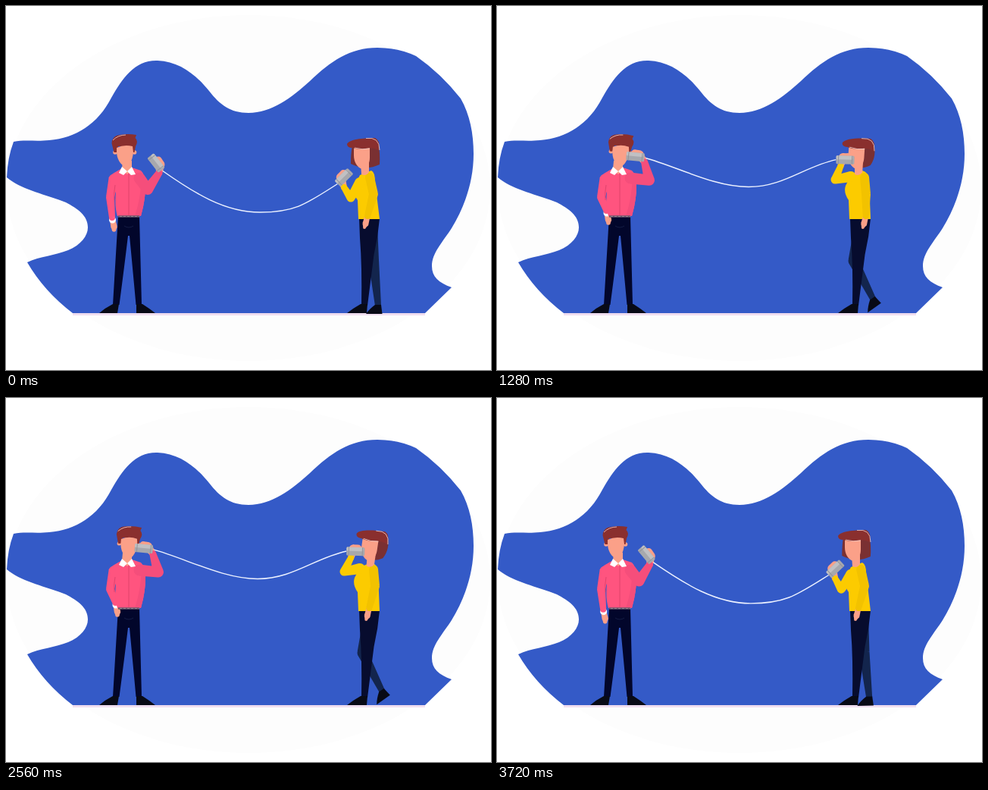
Write an HTML page that moves like this. It is 640x480 px and loops after 3.76 s.

```html
<!DOCTYPE html>
<html lang="en">
<head>
<meta charset="utf-8">
<title>Tin can telephone</title>
<style>
  html, body { margin: 0; width: 100%; height: 100%; overflow: hidden; background: #fff; }
  svg { display: block; width: 100vw; height: 100vh; }
  .skin { fill: #fba088; }
  .navy { fill: #02062b; }
  .shoe { fill: #080a16; }
  .pink { fill: #ff547f; }
  .rose { fill: #f54e7b; }
  .yellow { fill: #fccb00; }
  .amber { fill: #f2c200; }
  .hair { fill: #8a2f2e; }
  .bob { fill: #7a3032; }
  .shine { fill: none; stroke: #f0cfcb; stroke-width: .8; }
  .white { fill: #fff; }
</style>
</head>
<body>
<svg viewBox="0 0 640 480">
  <defs>
    <g id="tin">
      <rect x="-12" y="-5.5" width="24" height="11" rx="1.5" fill="#a7a8ad"/>
      <rect x="-12" y="-5.5" width="22" height="5" rx="1.5" fill="#c0c0c3"/>
      <path d="M-9-5.5V5.5M9-5.5V5.5" stroke="#929399"/>
    </g>
  </defs>

  <ellipse cx="320" cy="240" rx="319" ry="228" fill="#fdfdfd"/>
  <path fill="#345ac7" d="M10 179C25 176 39 179 57 177C92 174 121 156 139 121C154 95 170 71 200 72
    C229 73 251 91 268 112C282 130 296 141 320 141C350 141 377 121 401 99C428 73 454 55 490 55
    Q518 55 541 66Q574 89 600 122C612 143 617 168 617 195C617 232 605 265 588 293
    C575 313 562 326 562 343C562 357 571 365 588 371L553 405H88Q50 376 28 338
    C45 330 65 329 82 322C99 315 108 303 108 292C108 276 94 267 79 259C55 249 21 243 1 226Q2 200 10 179Z"/>
  <path d="M88 406.5H553" stroke="#f0def0" stroke-width="3"/>
  <path id="string" fill="none" stroke="#edf2ff" stroke-width="1.4"/>

  <g id="man">
    <path class="navy" d="M148 277H176L179 394H171.5Q167 345 163 303H161Q156 345 149.500 394H141Z"/>
    <path d="M156 290Q162 294 168 290" fill="none" stroke="#18214a" stroke-width=".8"/>
    <path class="shoe" d="M141 393H149L147 405H123Q131 398 141 393ZM172 393H180Q188 398 197 405H172Z"/>
    <path id="manRestHand" class="skin"/>
    <path id="manCuff" class="white"/>
    <path id="manRestArm" class="pink"/>
    <path id="manHand" class="skin"/>
    <path class="pink" d="M153 214L141 221Q136 226 138 236L145 246Q143 264 147 277H178Q184 256 184 238Q184 222 178 217L166 213Z"/>
    <path class="rose" d="M179 222Q178 254 170 277H178Q184 256 184 238Z"/>
    <path d="M162 221V276M144 236Q142 246 143 256" fill="none" stroke="#d83f69" stroke-width=".8"/>
    <path id="manArm" class="rose"/>
    <path class="skin" d="M154 204H166V215L160 222L153 215Z"/>
    <path class="white" d="M153 212L149 220L155 223L160 218ZM166 212L171 222L165 223L160 218Z"/>
    <path d="M148 277.5H176" stroke="#69576d" stroke-width="2.5"/>
    <path d="M150 277.500H176" stroke="#a68c94" stroke-width=".8" stroke-dasharray="3 2"/>
    <g id="manHead">
      <circle class="skin" cx="144" cy="193" r="2.8"/>
      <circle class="skin" cx="169.5" cy="193" r="2.8"/>
      <path class="hair" d="M142.500 193L139.500 181Q140 171 150 170Q161 168 172 170L170.500 174Q175 178 171 185L169.500 193H167L166 185H148L146 193Z"/>
      <path class="skin" d="M146 187Q156 182 167 185L168 193C167 203 163 211 158 212C151 210 146 201 146 192Z"/>
      <path class="shine" d="M141 177Q148 170 158 170"/>
    </g>
    <use id="manCan" href="#tin"/>
  </g>

  <g id="woman">
    <path id="backLeg" fill="#13254d"/>
    <path id="backShoe" class="shoe" d="M-4-1H4L5.500 11H-16Q-12 5-4-1Z"/>
    <path fill="#070c2e" d="M466 280H493Q491 304 485.500 328L477 395H469Q470 344 467 306Z"/>
    <path class="shoe" d="M468 393H477L476 405H450Q459 398 468 393Z"/>
    <path id="womanHand" class="skin"/>
    <path id="womanTop" class="yellow"/>
    <path id="womanArm" class="yellow"/>
    <path id="swingHand" class="skin"/>
    <path id="swingArm" class="amber"/>
    <g id="womanHead">
      <path id="bob" class="bob"/>
      <path class="skin" d="M468 206H479V219Q475 225 469 222Z"/>
      <path class="skin" d="M459 186H480V200C480 208 476 215 470 215C463 213 459 205 459 197Z"/>
      <path class="hair" d="M450 182C453 176 470 174 487 174Q494 177 492 190Q484 186 475 188Q466 190 457 187Q450 187 450 182Z"/>
      <path class="shine" d="M460 187Q470 190 480 188M475 174.500Q493 172 493 190"/>
    </g>
    <use id="womanCan" href="#tin"/>
  </g>
</svg>

<script>
const LOOP = 3760, STEP = 40;

// time, man's nod, woman's nod, swing of her free arm
const poses = [
  [0, 0, 0, 0],
  [440, 0, 0, 0],
  [760, 3, 2, 5],
  [1280, 7, 5, 13],
  [1920, 2.5, 5, 5],
  [2560, 6, 11, 3],
  [3080, 12, 12, 10],
  [3720, 0, 0, 0],
  [LOOP, 0, 0, 0]
];

const $ = id => document.getElementById(id);
const mix = (a, b, k) => a + (b - a) * k;
const mixPoint = (a, b, k) => a.map((v, i) => mix(v, b[i], k));
const add = ([x, y], [dx, dy]) => [x + dx, y + dy];
const ease = (from, to, t) => {
  const k = Math.min(1, Math.max(0, (t - from) / (to - from)));
  return k * k * (3 - 2 * k);
};
const draw = (id, d) => $(id).setAttribute('d', d);
const place = (id, value) => $(id).setAttribute('transform', value);

// Tapered rounded limb through [x, y, radius] joints
function limb(...joints) {
  const disc = ([x, y, r]) => `M${x - r} ${y}a${r} ${r} 0 1 0 ${2 * r} 0a${r} ${r} 0 1 0 ${-2 * r} 0Z`;
  let d = joints.map(disc).join('');
  for (let i = 1; i < joints.length; i++) {
    const [ax, ay, ar] = joints[i - 1], [bx, by, br] = joints[i];
    const length = Math.hypot(bx - ax, by - ay) || 1;
    const nx = (ay - by) / length, ny = (bx - ax) / length;
    d += `M${ax + nx * ar} ${ay + ny * ar}L${bx + nx * br} ${by + ny * br}` +
         `L${bx - nx * br} ${by - ny * br}L${ax - nx * ar} ${ay - ny * ar}Z`;
  }
  return d;
}

function local([x, y, angle], dx, dy) {
  const a = angle * Math.PI / 180, c = Math.cos(a), s = Math.sin(a);
  return [x + dx * c - dy * s, y + dx * s + dy * c];
}

function setCan(id, [x, y, angle]) {
  place(id, `translate(${x} ${y}) rotate(${angle})`);
}

function nod(id, amount, x, y) {
  place(id, `translate(${amount * .62} 0) rotate(${amount * .75} ${x} ${y})`);
}

function poseAt(t) {
  const i = Math.max(1, poses.findIndex(p => p[0] > t));
  const a = poses[i - 1], b = poses[i];
  return mixPoint(a, b, ease(a[0], b[0], t)).slice(1);
}

function drawMan(call, tilt) {
  const can = mixPoint([198, 207, 52], [177.500 + tilt * .72, 197 + tilt * .25, 4 + tilt * .25], call);
  const wrist = add(can, [mix(4, 12, call), mix(13, 7, call)]);
  const elbow = mixPoint([187, 242], [201, 229 + tilt * .1], call);
  const cuff = mixPoint([140.5, 282], [145, 273], call);
  const palm = add(cuff, [2, 9]);

  nod('manHead', tilt, 160, 214);
  setCan('manCan', can);
  draw('manHand', limb([...wrist, 4], [...local(can, 5, -3), 6], [...local(can, -1, -4.5), 5]));
  draw('manArm', limb([176, 227, 7.5], [...elbow, 7], [...wrist, 4.5]));
  draw('manRestArm', limb([142, 228, 6.5], [137.5, 252, 5.5], [...add(cuff, [-.5, -3]), 4]));
  draw('manCuff', limb([...cuff, 4.5]));
  draw('manRestHand', limb([...cuff, 3.5], [...palm, 4.2], [...add(palm, [0, 4]), 2.8]));
  return local(can, 12, 0);
}

function drawWoman(call, tilt, swing) {
  const can = mixPoint([446, 226, -45], [458 + tilt * .3, 203.500 - tilt * .1, 2], call);
  const wrist = add(can, [mix(0, -6, call), mix(13, 8, call)]);
  const elbow = mixPoint([455, 253], [446, 229], call);
  elbow[0] -= 4 * Math.sin(Math.PI * call);
  const free = [477 + swing * .75, 277];
  const knee = mixPoint([485, 335], [470.500, 336], call);
  const ankle = mixPoint([491, 395], [496, 386], call);

  nod('womanHead', tilt, 474, 220);
  const left = mix(455, 463, call), right = mix(493, 489, call), curl = mix(494, 497, call);
  draw('bob', `M457 184Q${left} 194 ${left} 208Q474 218 ${right} 209Q${curl} 196 491 178Z`);
  const shoulder = mix(487, 491, call);
  draw('womanTop', `M467 223L482 217Q${shoulder} 219 ${shoulder} 232L493 281H465L464 256Q457 246 460 237Z`);
  setCan('womanCan', can);
  draw('womanHand', limb([...wrist, 4], [...local(can, -3, -3), 6], [...local(can, 3, -4), 5]));
  draw('womanArm', limb([467, mix(233, 225, call), 7], [...elbow, 5.5], [...wrist, 4]));
  draw('swingHand', limb([...free, 3.5], [...add(free, [-2.5, 10]), 4], [...add(free, [-4, 15]), 2]));
  draw('swingArm', limb([mix(480, 485, call), 226, 6], [mix(485, 487, call), 248, 6], [...free, 4]));
  draw('backLeg', limb([481, 288, 9], [...knee, 7], [...ankle, 4]));
  place('backShoe', `translate(${ankle}) rotate(${-35 * call})`);
  return local(can, -12, 0);
}

function render(now) {
  const t = Math.floor(now % LOOP / STEP) * STEP;
  const call = ease(440, 1120, t) - ease(3080, 3800, t);
  const [manTilt, womanTilt, swing] = poseAt(t);
  const from = drawMan(call, manTilt);
  const to = drawWoman(call, womanTilt, swing);
  const low = [mix(335, 332, call), mix(272, 238.500, call)];
  const out = add(from, [44, mix(31, 12, call)]);
  const back = add(to, [-42, mix(27, 9, call)]);
  draw('string', `M${from}C${out} ${low[0] - 46} ${low[1]} ${low}S${back} ${to}`);
}

const start = performance.now();
function tick() {
  render(performance.now() - start);
  requestAnimationFrame(tick);
}
tick();
</script>
</body>
</html>
```
